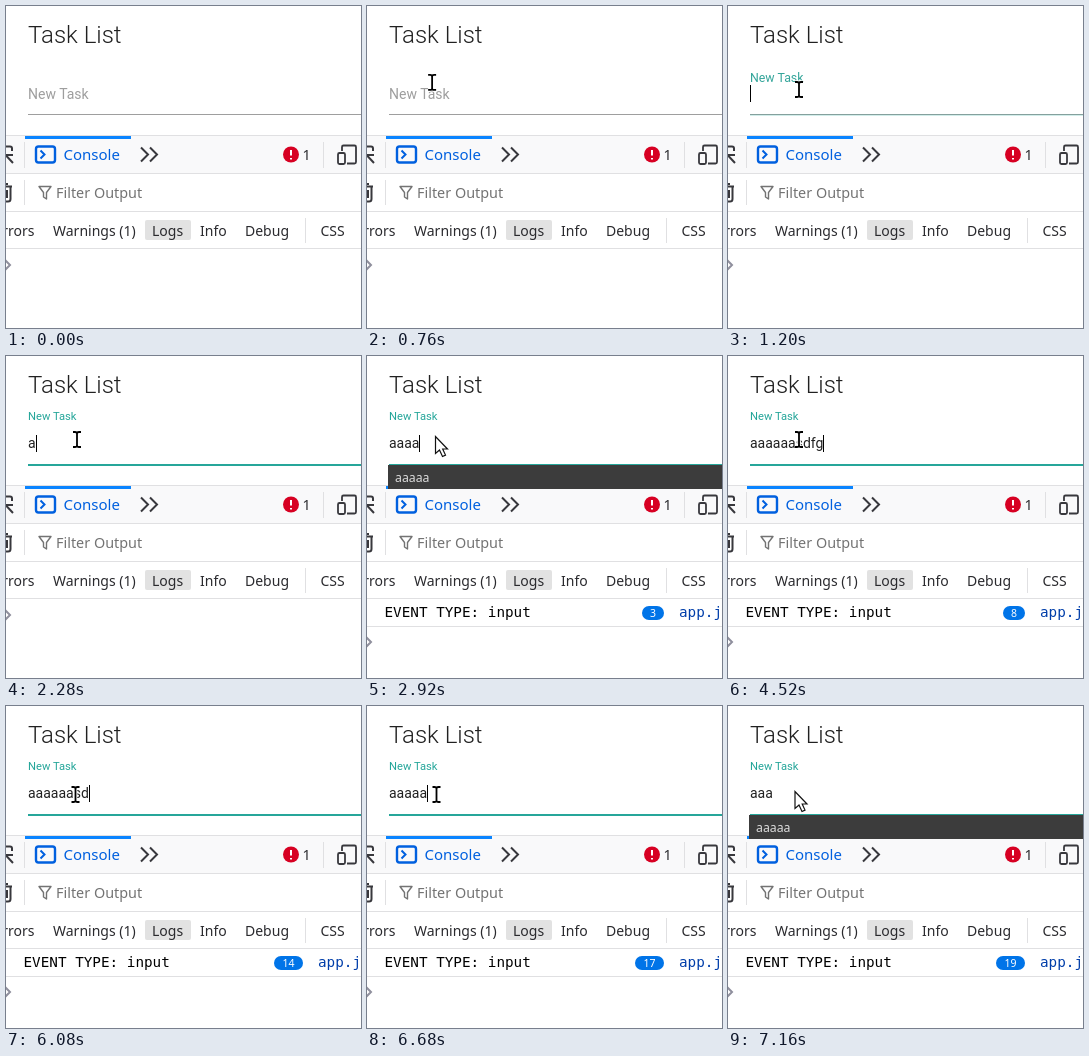
An HTML page that plays this animation: 355x322 px, repeating every 8000 ms.

```html
<!DOCTYPE html>
<html lang="en">
<head>
<meta charset="utf-8">
<title>Task List</title>
<style>
  html, body { margin: 0; width: 100%; height: 100%; overflow: hidden; background: #fff; }
  svg { display: block; font-family: "Noto Sans", "Open Sans", sans-serif; fill: #2a2a2e; }
  .app { font-family: Roboto, sans-serif; font-size: 14px; fill: #212121; }
  .mono { font: 14.3px "DejaVu Sans Mono", monospace; fill: #000; }
  .rule { fill: #e0e0e2; }
  .icon { fill: none; stroke: #38383d; stroke-width: 2; }
  .cats { font-size: 14px; }
</style>
</head>
<body>
<svg width="355" height="322" viewBox="0 0 355 322">
  <g class="app">
    <text x="22" y="37" font-size="24" font-weight="300">Task List</text>
    <text id="label">New Task</text>
    <text id="value" x="22" y="92"></text>
    <rect id="caret" y="79" width="1" height="17" fill="#000"/>
    <rect x="22" y="108" width="333" height="1" fill="#9e9e9e"/>
    <rect id="line" x="22" y="108" width="333" height="2" fill="#26a69a"/>
  </g>

  <!-- tab bar -->
  <rect y="130" width="355" height="37" fill="#f9f9fa"/>
  <g class="rule">
    <rect y="129" width="355" height="1"/>
    <rect y="167" width="355" height="1"/>
    <rect y="205" width="355" height="1"/>
    <rect y="242" width="355" height="1"/>
    <rect x="18" y="136" width="1" height="26"/>
    <rect x="18" y="174" width="1" height="25"/>
    <rect x="317" y="136" width="1" height="26"/>
    <rect x="299" y="212" width="1" height="25"/>
  </g>
  <rect x="19" y="130" width="106" height="3" fill="#0a84ff"/>
  <g class="icon">
    <path d="M-2 140.5H4Q6 140.5 6 142.5V145M7 149H-1V157M0 149.5L7 157"/>
    <path d="M135 141.5L142 148.5L135 155.5M144 141.5L151 148.5L144 155.5"/>
    <path d="M336 145V141Q336 139.5 337.500 139.500H348.500Q350 139.500 350 141V156Q350 157.500 348.500 157.500H341" stroke-width="1.8"/>
    <rect x="332" y="147" width="7" height="11" rx="1.5" stroke-width="1.8"/>
    <path d="M-2 180.500H6M4.500 181V193Q4.500 195.500 2 195.500H-2M1 184V192M-1 178H2"/>
    <path d="M33 180.500H45L40.500 186.500V193L37.500 191V186.500Z" stroke="#737373" stroke-width="1.4" stroke-linejoin="round"/>
    <g stroke="#0060df">
      <rect x="30" y="140.500" width="19" height="16" rx="2.500" stroke-width="2.400"/>
      <path d="M34.500 144.500L38.500 148.500L34.500 152.500"/>
    </g>
  </g>
  <text x="57.500" y="154" font-size="15" fill="#0060df">Console</text>
  <circle cx="285" cy="148.500" r="8" fill="#d70022"/>
  <path d="M285 144V149.500M285 152V153.500" stroke="#fff" stroke-width="2"/>
  <text x="296.500" y="154" font-size="14.300">1</text>

  <!-- filters -->
  <text x="50" y="192" font-size="14.400" fill="#737373">Filter Output</text>
  <rect x="139" y="214" width="46" height="20" rx="2" fill="#e2e2e2"/>
  <g class="cats">
    <text x="28.500" y="230" text-anchor="end">Errors</text>
    <text x="47" y="230">Warnings (1)</text>
    <text x="146" y="230">Logs</text>
    <text x="194" y="230">Info</text>
    <text x="239" y="230">Debug</text>
    <text x="314.500" y="230">CSS</text>
  </g>

  <!-- console output -->
  <g id="row">
    <text class="mono" x="17.500" y="261">EVENT TYPE: input</text>
    <rect class="rule" y="270" width="355" height="1"/>
    <g id="badge">
      <rect id="pill" y="250" height="14" rx="7" fill="#0074e8"/>
      <text id="count" y="260.800" font-size="10.500" text-anchor="middle" style="fill:#fff"></text>
    </g>
    <text class="mono" x="312" y="261" style="fill:#003eaa">app.js</text>
  </g>
  <path id="prompt" class="icon" d="M-1 -5L4 0L-1 5" style="stroke:#8f8f9d"/>

  <!-- autocomplete -->
  <g id="popup">
    <rect x="21" y="109" width="334" height="24" fill="#3c3c3c"/>
    <text x="28" y="126" font-size="12.300" fill="#dcdcdc">aaaaa</text>
  </g>

  <path id="arrow" d="M0 0V17L4 13.500L7 20L10 18.600L7.200 12.500H12Z" fill="#fff" stroke="#111" stroke-width="1.200"/>
  <g id="beam" fill="none">
    <path d="M-4 -7.500H-2Q0 -7.500 0 -6Q0 -7.500 2 -7.500H4M0 -6V6M-4 7.500H-2Q0 7.500 0 6Q0 7.500 2 7.500H4" stroke="#fff" stroke-width="3.600"/>
    <path d="M-4 -7.500H-2Q0 -7.500 0 -6Q0 -7.500 2 -7.500H4M0 -6V6M-4 7.500H-2Q0 7.500 0 6Q0 7.500 2 7.500H4" stroke="#000" stroke-width="1.800"/>
  </g>
</svg>
<script>
const LOOP = 8000, FOCUS = 1120, TYPED = "aaaaaasdfgh";
// Key presses: the first ones type TYPED, the rest are backspaces.
const KEYS = [2280, 2520, 2720, 2920, 3200, 3480, 4000, 4240, 4520, 4520, 4720,
  5600, 5800, 6040, 6200, 6360, 6560, 6840, 7120];

const el = id => document.getElementById(id);
const show = (id, on) => el(id).style.display = on ? "" : "none";
const place = (id, x, y, scale = 1) =>
  el(id).setAttribute("transform", `translate(${x} ${y}) scale(${scale})`);
const mix = (a, b, u) => a + (b - a) * u;
const span = (t, from, to) => Math.min(1, Math.max(0, (t - from) / (to - from)));
const smooth = u => u * u * (3 - 2 * u);
const presses = t => KEYS.filter(k => k <= t).length;
const textAt = t => {
  const n = presses(t);
  return TYPED.slice(0, n <= TYPED.length ? n : 2 * TYPED.length - n);
};

function drawField(t) {
  const u = 1 - (1 - span(t, FOCUS, FOCUS + 200)) ** 1.7;
  place("label", 22, mix(93, 64.2, u), mix(1, 0.8, u));
  const tint = Math.min(1, u * 1.5);
  el("label").style.fill =
    `rgb(${mix(158, 38, tint)},${mix(158, 166, tint)},${mix(158, 154, tint)})`;
  el("line").style.opacity = smooth(span(t, FOCUS, FOCUS + 280));

  const value = el("value");
  value.textContent = textAt(t);
  const width = value.textContent ? value.getComputedTextLength() : 0;
  el("caret").setAttribute("x", Math.round(22 + width));
  show("caret", t >= FOCUS && t < 7160);
}

function drawConsole(t) {
  const n = presses(t - 40), width = n > 9 ? 29 : 22;
  show("row", n > 0);
  show("badge", n > 1);
  el("count").textContent = n;
  el("count").setAttribute("x", 297 - width / 2);
  el("pill").setAttribute("x", 297 - width);
  el("pill").setAttribute("width", width);
  place("prompt", 0, n ? 286 : 259);
}

function drawPointer(t, popup) {
  const u = smooth(span(t, 620, 840)), v = smooth(span(t, 4780, 4960));
  const x = mix(51, 71, u) - 1.5 * v, y = mix(59.5, 83.5, u) + 5 * v;
  const arrow = popup || y < 67;
  place("arrow", x - 2.5, y - 3);
  place("beam", x, y);
  show("arrow", t >= 480 && arrow);
  show("beam", t >= 480 && !arrow);
}

function draw(now) {
  const t = now % LOOP;
  const popup = /^a{1,4}$/.test(textAt(t - 80));
  drawField(t);
  drawConsole(t);
  show("popup", popup);
  drawPointer(t, popup);
}

const start = performance.now();
function tick() {
  draw(performance.now() - start);
  requestAnimationFrame(tick);
}
tick();
</script>
</body>
</html>
```
